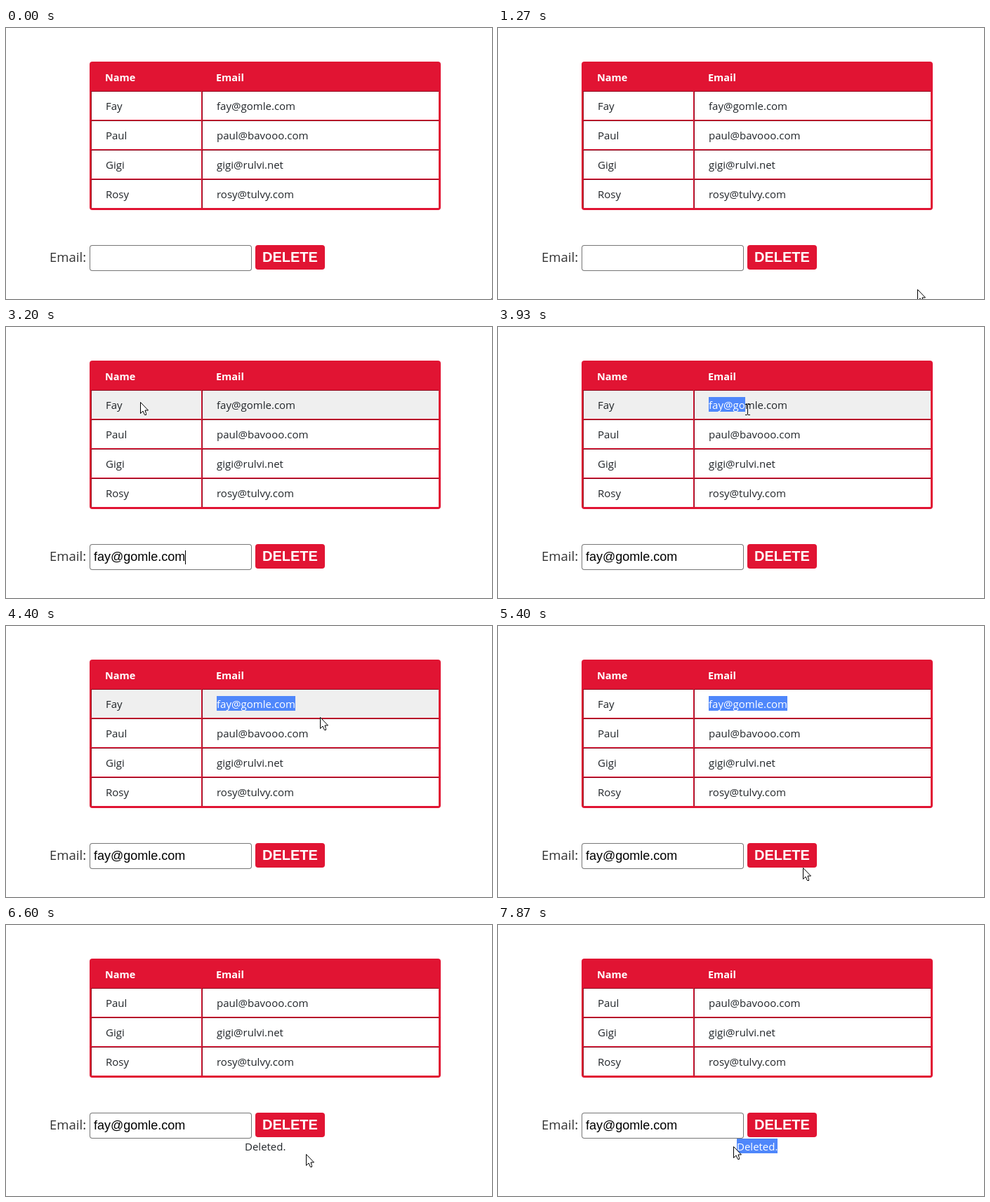
Write an HTML page with a canvas that moves like this. It is 692 px wide and 387 px high and loops after 8 s.

```html
<!DOCTYPE html>
<html lang="en">
<head>
<meta charset="utf-8">
<title>Delete by email</title>
<style>
  html, body { margin: 0; width: 100%; height: 100%; overflow: hidden; background: #fff; }
  canvas { display: block; }
</style>
</head>
<body>
<canvas id="stage" width="692" height="387"></canvas>
<script>
const ctx = document.getElementById('stage').getContext('2d');
const LOOP = 8000, STEP = 1000 / 15;
const RED = '#e11433', DARK = '#8d0c20', INK = '#212529', BLUE = '#4f87fb';
const SANS = '"Open Sans", "Noto Sans", sans-serif';
const ARIAL = '"Liberation Sans", Arial, sans-serif';
const BODY = '15px ' + SANS, HEAD = 'bold 14.5px ' + SANS;
const FOCUS = 1860, PASTE = 2795, DRAG_ROW = 3600, DELETED = 6595, DRAG_NOTE = 7400;
const BLINK = 533, ROW = 42, BODY_TOP = 90;

const people = [
  ['Fay', 'fay@gomle.com'],
  ['Paul', 'paul@bavooo.com'],
  ['Gigi', 'gigi@rulvi.net'],
  ['Rosy', 'rosy@tulvy.com']
];

// each move eases the pointer from where it rests to a new spot
const home = { x: 691, y: 386 };
const moves = [
  { from: 1066, to: 1733, x: 259, y: 326 },
  { from: 2533, to: 2800, x: 240, y: 371 },
  { from: 2800, to: 3200, x: 191, y: 107 },
  { from: 3200, to: DRAG_ROW, x: 299, y: 110 },
  { from: DRAG_ROW, to: 4400, x: 447, y: 130 },
  { from: 4933, to: 5200, x: 508, y: 240 },
  { from: 5200, to: 5400, x: 434, y: 345 },
  { from: 5400, to: 5733, x: 427, y: 327 },
  { from: 6800, to: 6933, x: 436, y: 327 },
  { from: 7000, to: 7333, x: 426, y: 321 },
  { from: DRAG_NOTE, to: 7867, x: 335, y: 316 }
];

const smooth = k => k * k * (3 - 2 * k);

function pointerAt(t) {
  let { x, y } = home;
  for (const m of moves) {
    const k = smooth(Math.min(1, Math.max(0, (t - m.from) / (m.to - m.from))));
    x += (m.x - x) * k;
    y += (m.y - y) * k;
  }
  return [Math.round(x), Math.round(y)];
}

const inside = (x, y, l, t, w, h) => x >= l && x < l + w && y >= t && y < t + h;

function rect(color, x, y, w, h) {
  ctx.fillStyle = color;
  ctx.fillRect(x, y, w, h);
}

function rounded(color, x, y, w, h, r) {
  ctx.fillStyle = color;
  ctx.beginPath();
  ctx.roundRect(x, y, w, h, r);
  ctx.fill();
}

function text(str, x, y, font = BODY, color = INK) {
  ctx.font = font;
  ctx.fillStyle = color;
  ctx.fillText(str, x, y);
}

// x of the letter boundary nearest to px
function snap(str, x, px) {
  ctx.font = BODY;
  let best = x;
  for (let i = 1; i <= str.length; i++) {
    const edge = x + ctx.measureText(str.slice(0, i)).width;
    if (Math.abs(edge - px) < Math.abs(best - px)) best = edge;
  }
  return Math.round(best);
}

function select(str, x, y, from, to) {
  const l = snap(str, x, from), r = snap(str, x, to);
  if (r <= l) return;
  ctx.save();
  ctx.beginPath();
  ctx.rect(l, y - 17, r - l, 21);
  ctx.clip();
  rect(BLUE, l, y - 17, r - l, 21);
  text(str, x, y, BODY, '#fff');
  ctx.restore();
}

// cell with a 1px inset border: dark above and left, red below and right
function cell(str, x, y, w, fill) {
  rect(RED, x, y, w, ROW);
  rect(DARK, x, y, w - 1, ROW - 1);
  rect(fill, x + 1, y + 1, w - 2, ROW - 2);
  text(str, x + 21, y + 27);
}

function table(rows, hover) {
  rounded(RED, 119, 48, 500, ROW * (rows.length + 1) + 2, 4);
  text('Name', 141, 76, HEAD, '#fff');
  text('Email', 299, 76, HEAD, '#fff');
  rows.forEach(([name, email], i) => {
    const y = BODY_TOP + i * ROW, fill = i == hover ? '#efefef' : '#fff';
    cell(name, 121, y, 158, fill);
    cell(email, 279, y, 338, fill);
  });
}

function form(top, value, caret) {
  const base = top + 24;
  text('Email:', 62, base, '18.5px ' + SANS, '#333');
  rounded('#767676', 119, top, 231, 37, 4);
  rounded('#fff', 120, top + 1, 229, 35, 3);
  text(value, 125, base, '18px ' + ARIAL, '#000');
  if (caret) rect('#000', 125 + Math.round(ctx.measureText(value).width), top + 9, 1, 20);
  rounded(RED, 355, top, 99, 35, 4);
  text('DELETE', 365, base, 'bold 20px ' + ARIAL, '#fff');
}

function outline(x, y, d) {
  const shape = new Path2D(d);
  ctx.save();
  ctx.translate(x + 0.5, y + 0.5);
  ctx.fillStyle = '#fff';
  ctx.strokeStyle = '#000';
  ctx.fill(shape);
  ctx.stroke(shape);
  ctx.restore();
}

const arrow = (x, y) => outline(x, y, 'M0 0V16L3.5 12.5L6 18H8V16L6.5 11.5H11Z');
const hand = (x, y) => outline(x - 6, y,
  'M5 13V2Q5 0 6.5 0T8 2V8V6Q10.5 5 11 7V8Q13 6.5 14 9Q16 8 16 10V15L14 18V21H6V18L1 12Q0 9 2.5 10Z');

function beam(x, y) {
  rect('#000', x, y - 7, 1, 14);
  for (const row of [y - 8, y + 7]) {
    rect('#000', x - 3, row, 3, 1);
    rect('#000', x + 1, row, 3, 1);
  }
}

function caretOn(t) {
  if (t < FOCUS || t >= DRAG_ROW) return false;
  const since = t - (t < PASTE ? FOCUS : PASTE);
  return since % (2 * BLINK) < BLINK;
}

function draw(t) {
  const [x, y] = pointerAt(t);
  const gone = t >= DELETED, top = gone ? 268 : 310;
  const rows = gone ? people.slice(1) : people;
  const email = people[0][1];
  const hover = inside(x, y, 121, BODY_TOP, 496, rows.length * ROW) ? Math.floor((y - BODY_TOP) / ROW) : -1;

  rect('#fff', 0, 0, 692, 387);
  table(rows, hover);
  form(top, t >= PASTE ? email : '', caretOn(t));
  if (t >= DRAG_ROW && !gone) select(email, 300, 117, 300, Math.max(x, 300));
  if (gone) text('Deleted.', 340, 322);
  if (t >= DRAG_NOTE) select('Deleted.', 340, 322, x, 400);

  const onText = gone ? inside(x, y, 340, 305, 58, 21) : inside(x, y, 299, 100, 114, 21);
  if (onText || inside(x, y, 119, top, 231, 37)) beam(x, y);
  else if (inside(x, y, 355, top, 99, 35)) hand(x, y);
  else arrow(x, y);
}

function tick() {
  const t = performance.now() % LOOP;
  draw(Math.floor((t + 4) / STEP) * STEP % LOOP);
  requestAnimationFrame(tick);
}
tick();
</script>
</body>
</html>
```
